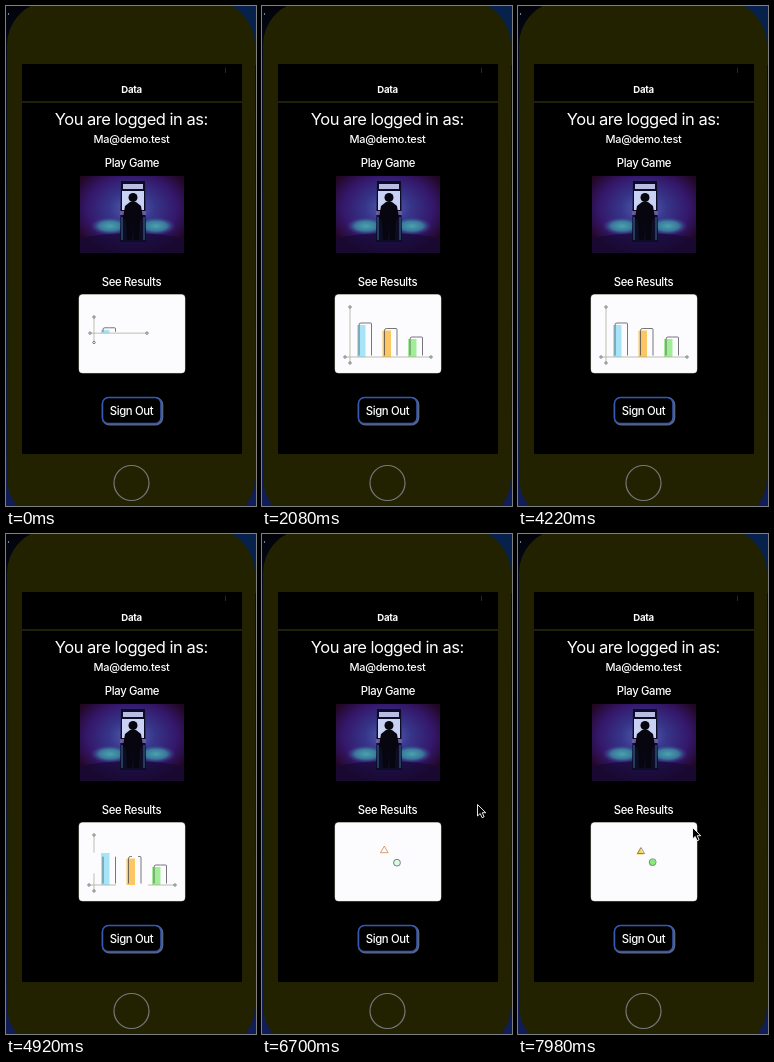
An HTML page that plays this animation: 250x500 px, repeating every 8000 ms.

```html
<!DOCTYPE html>
<html lang="en">
<head>
<meta charset="utf-8">
<title>Data screen</title>
<style>
  html, body { margin: 0; width: 100%; height: 100%; overflow: hidden; background: #03040b; }
  svg { display: block; width: 250px; height: 500px; }
  text { font: 500 11.3px Inter, Roboto, sans-serif; letter-spacing: -.03em; fill: #fff; text-anchor: middle; }
  .title { font-size: 16.5px; font-weight: 400; }
  .heading { font-size: 9.6px; font-weight: 700; }
  .line { fill: none; stroke: #a3a58f; stroke-width: .7; }
  .outline { fill: none; stroke: #3a3d42; stroke-width: .7; stroke-linejoin: round; }
  .knob { fill: #fff; stroke: #44474b; stroke-width: .7; }
</style>
</head>
<body>
<svg viewBox="0 0 250 500">
  <defs>
    <linearGradient id="desk" x2="0" y2="1">
      <stop stop-color="#020309"/><stop offset=".12" stop-color="#060b24"/>
      <stop offset=".8" stop-color="#0a1a44"/><stop offset="1" stop-color="#111d58"/>
    </linearGradient>
    <radialGradient id="glow" cx=".5" cy=".42" r=".62">
      <stop stop-color="#5c62b4"/><stop offset=".35" stop-color="#36368a"/>
      <stop offset=".7" stop-color="#34176a"/><stop offset="1" stop-color="#220622"/>
    </radialGradient>
    <radialGradient id="pool">
      <stop stop-color="#4aa5ae"/><stop offset=".55" stop-color="#3c86a2" stop-opacity=".85"/>
      <stop offset="1" stop-color="#3a3a8c" stop-opacity="0"/>
    </radialGradient>
    <clipPath id="photo"><rect x="74" y="170" width="104" height="77"/></clipPath>
  </defs>

  <rect width="250" height="500" fill="url(#desk)"/>
  <path d="M205 0H250V60Z" fill="#06224c"/>
  <circle cx="2.5" cy="8" r=".7" fill="#b9c2d8"/>
  <rect x="1" y="-5" width="248" height="521" rx="44" fill="#232200"/>
  <rect x="16" y="58" width="220" height="390"/>
  <path d="M16 96H236" stroke="#40400c"/>
  <path d="M219.5 62v5" stroke="#7c1420" stroke-width=".8"/>
  <circle cx="125.5" cy="477" r="17.5" fill="none" stroke="#77777c" stroke-width="1.2"/>

  <text class="heading" x="125.5" y="87">Data</text>
  <text class="title" x="125.3" y="119">You are logged in as:</text>
  <text x="125.5" y="137" style="font-size:11px">Ma@demo.test</text>
  <text x="126" y="161">Play Game</text>
  <text x="125.5" y="280.4">See Results</text>

  <g clip-path="url(#photo)">
    <rect x="74" y="170" width="104" height="77" fill="url(#glow)"/>
    <path d="M74 232Q126 222 178 232V247H74Z" fill="#160a34" opacity=".75"/>
    <ellipse cx="104" cy="220" rx="20" ry="9" fill="url(#pool)"/>
    <ellipse cx="150" cy="220" rx="20" ry="9" fill="url(#pool)"/>
    <path d="M115 175h24l1 61h-26z" fill="#0c0c26"/>
    <path d="M117 178h20v5h-20z" fill="#b9bde2"/>
    <path d="M116 185h22v19h-22z" fill="#c9d2f2"/>
    <path d="M114 205h26v4h-26z" fill="#6a5aa2"/>
    <path d="M116 211v23M138 211v23" stroke="#3c6f8c"/>
    <circle cx="127" cy="191.500" r="4.500" fill="#07060f"/>
    <path d="M124 196h6l5 4 2 12-3 2-1 20h-5l-1-14-1 14h-5l-1-20-3-2 2-12z" fill="#07060f"/>
  </g>

  <rect x="73" y="288.5" width="106" height="78.500" rx="3.500" fill="#fcfcff" stroke="#e6e6cf" stroke-width=".5"/>
  <g id="chart"></g>

  <rect x="97" y="392.3" width="59" height="26" rx="6.5" stroke="#5d6480" stroke-width="2.600"/>
  <rect x="96.5" y="391.5" width="58.500" height="26" rx="6" stroke="#3359b4" stroke-width="1.500"/>
  <text x="125.5" y="408.7">Sign Out</text>

  <path id="cursor" d="M0 0V11.5L2.7 9 4.6 13.2 6.6 12.3 4.8 8.2H8.3Z" stroke="#fff" stroke-width=".9"/>
</svg>

<script>
const LOOP = 8000;
const chart = document.getElementById('chart');
const cursor = document.getElementById('cursor');

const set = (el, attrs) => { for (const k in attrs) el.setAttribute(k, attrs[k]); };
const add = (tag, attrs) => {
  const el = document.createElementNS('http://www.w3.org/2000/svg', tag);
  set(el, attrs);
  return chart.appendChild(el);
};
const show = (el, visible) => el.setAttribute('visibility', visible ? 'visible' : 'hidden');
const smooth = p => p * p * (3 - 2 * p);
const easeOut = p => 1 - (1 - p) ** 3;
const phase = (t, from, to) => Math.min(1, Math.max(0, (t - from) / (to - from)));

// Eased value of a track of [time, value] keys.
const track = (t, keys, ease = smooth) => {
  const next = keys.findIndex(k => k[0] > t);
  if (next < 0) return keys[keys.length - 1][1];
  if (next === 0) return keys[0][1];
  const [t0, v0] = keys[next - 1], [t1, v1] = keys[next];
  return v0 + (v1 - v0) * ease((t - t0) / (t1 - t0));
};

// Opens a gap in the middle of a path, as a fraction of its length.
const openGap = (el, gap) => {
  el.setAttribute('stroke-dasharray', `${(1 - gap) / 2} ${gap} 2`);
  show(el, gap < .998);
};
// Draws a path from its start.
const drawOn = (el, part) => {
  el.setAttribute('stroke-dasharray', `${part} 2`);
  show(el, part > .002);
};

const bars = [
  { x: 97, height: 34, grow: -60, color: '#a8e4f7' },
  { x: 122.5, height: 28.5, grow: 100, color: '#fcc763' },
  { x: 148, height: 20, grow: 300, color: '#a2ee96' }
].map(bar => ({
  ...bar,
  fill: add('rect', { x: bar.x - 2, width: 8.5, fill: bar.color }),
  outline: add('path', { class: 'outline', pathLength: 1 })
}));
const axes = [0, 1].map(() => add('path', { class: 'line', pathLength: 1 }));
const knobs = [0, 1, 2, 3].map(() => add('circle', { class: 'knob' }));

const triangleShape = 'M0-3.6L3.8 3H-3.8Z';
const triangleFill = add('path', { d: triangleShape, fill: '#f8d458' });
const triangle = add('path', { class: 'outline', d: triangleShape, pathLength: 1 });
const discFill = add('circle', { r: 3.5, fill: '#8bea7c' });
const disc = add('circle', { class: 'outline', r: 3.4, pathLength: 1 });

function drawAxes(t) {
  const y = track(t, [[0, 327], [500, 351]], easeOut);
  const top = track(t, [[0, 311], [860, 311], [1500, 301]]);
  const bottom = track(t, [[0, 336.5], [600, 360.5], [860, 360.5], [1500, 357]]);
  const left = track(t, [[0, 84], [600, 83]]);
  const right = track(t, [[0, 141], [600, 171], [860, 171], [1500, 169]]);
  const radius = 1.2 * (1 - smooth(phase(t, 5200, 5700)));

  set(axes[0], { d: `M${left} ${y}H${right}` });
  set(axes[1], { d: `M88 ${top}V${bottom}` });
  axes.forEach(axis => openGap(axis, smooth(phase(t, 4550, 5450))));
  [[left, y], [right, y], [88, top], [88, bottom]].forEach(([cx, cy], i) => {
    set(knobs[i], { cx, cy, r: radius });
    show(knobs[i], radius > .02);
  });
  return y;
}

function drawBars(t, base) {
  bars.forEach(({ x, height, grow, fill, outline }, i) => {
    const h = height * easeOut(phase(t, grow, grow + 1100));
    const sink = 1 - smooth(phase(t, 4950 + i * 150, 5550 + i * 150));
    const filled = Math.max(0, h - 2) * sink;
    const bottom = base - Math.min(1.5, h / 4);
    const corner = Math.min(2, h / 3);
    set(fill, { y: base - filled, height: filled });
    set(outline, {
      d: `M${x} ${bottom}V${base - h + corner}q0 ${-corner} ${corner} ${-corner}` +
         `H${x + 12.5 - corner / 2}q${corner / 2} 0 ${corner / 2} ${corner / 2}V${bottom}`
    });
    openGap(outline, h > .1 ? smooth(phase(t, 4600 + i * 150, 5500 + i * 150)) : 1);
  });
}

function drawShapes(t) {
  const settle = smooth(phase(t, 6750, 7800));
  set(triangle, {
    transform: `translate(${122.3 + .7 * settle} ${315.7 + 1.1 * settle}) scale(${1 - .08 * settle})`,
    style: `stroke:${settle > .5 ? '#5b5540' : '#c9792f'}`
  });
  set(triangleFill, {
    transform: `translate(${122.3 - .3 * settle} ${316.3 + 1.1 * settle})`,
    opacity: settle
  });
  set(disc, {
    cx: 135 - .3 * settle, cy: 328.7 - .6 * settle,
    style: `stroke:${settle > .5 ? '#667166' : '#34536b'}`
  });
  set(discFill, { cx: 134.3, cy: 328.6, opacity: .25 * phase(t, 6400, 6700) + .75 * settle });
  drawOn(triangle, smooth(phase(t, 5850, 6550)));
  drawOn(disc, smooth(phase(t, 6000, 6700)));
}

function drawCursor(t) {
  const x = track(t, [[5680, 237], [6600, 215.5], [6750, 215.5], [7980, 174.5]]);
  const y = track(t, [[5680, 500], [6600, 270.5], [6750, 270.5], [7980, 293.5]]);
  set(cursor, { transform: `translate(${x} ${y})` });
  show(cursor, t > 5680);
}

function draw() {
  const t = performance.now() % LOOP;
  drawBars(t, drawAxes(t));
  drawShapes(t);
  drawCursor(t);
  requestAnimationFrame(draw);
}
draw();
</script>
</body>
</html>
```
